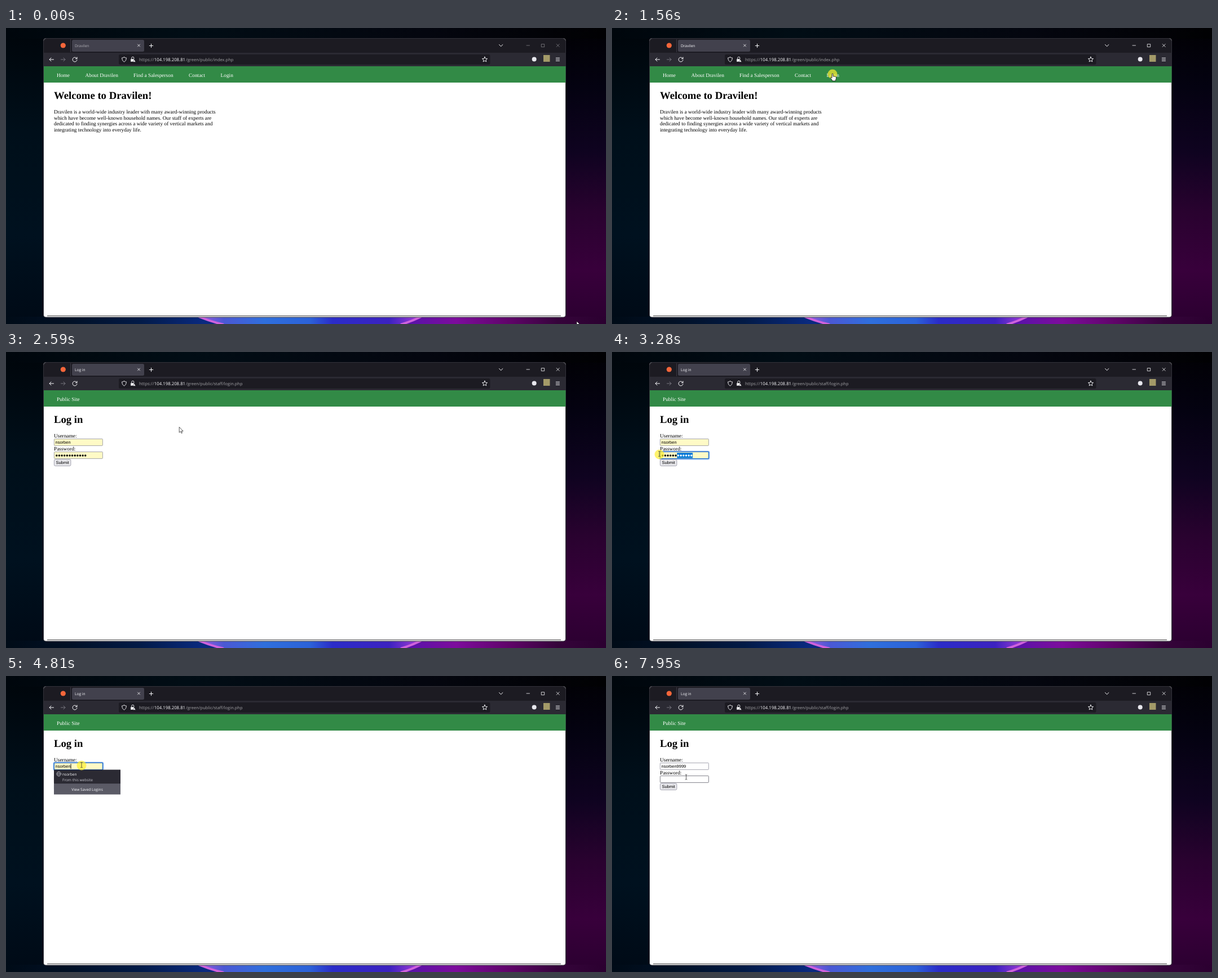
Animation, 1064 px wide and 526 px high, one loop 8 s. Source, as an HTML page:

```html
<!DOCTYPE html>
<html lang="en">
<head>
<meta charset="utf-8">
<title>Login demo</title>
<style>
  html, body { margin: 0; width: 100%; height: 100%; overflow: hidden; background: #000; }
  svg { display: block; width: 1064px; height: 526px; }
  text { text-rendering: geometricPrecision; white-space: pre; }
  .ui { font-family: "Open Sans", "Noto Sans", sans-serif; fill: #fbfbfe; }
  .page { font: 9.36px "Liberation Serif", "Times New Roman", serif; fill: #000; }
  .nav { fill: #fff; }
  .page .h1 { font-size: 18.72px; font-weight: bold; }
  .field { font: 7.5px "Liberation Sans", Arial, sans-serif; fill: #000; }
  .icon { fill: none; stroke: #fbfbfe; stroke-width: 1; stroke-linecap: round; stroke-linejoin: round; }
  .box { fill: #fff; stroke: #8f8f9d; stroke-width: .8; }
  .ring { fill: none; stroke: #0a5fd0; stroke-width: 1.3; }
  .halo { fill: none; stroke: #a9cdf5; stroke-width: 1.2; }
</style>
</head>
<body>
<svg viewBox="0 0 1064 526">
  <defs>
    <linearGradient id="left" x2="0" y2="1">
      <stop stop-color="#00050a"/><stop offset=".35" stop-color="#000f1a"/>
      <stop offset=".7" stop-color="#00111f"/><stop offset="1" stop-color="#000a16"/>
    </linearGradient>
    <linearGradient id="right" x2="0" y2="1">
      <stop stop-color="#010104"/><stop offset=".2" stop-color="#040211"/>
      <stop offset=".42" stop-color="#0f0320"/><stop offset=".62" stop-color="#29022f"/>
      <stop offset=".82" stop-color="#38003b"/><stop offset="1" stop-color="#2b0030"/>
    </linearGradient>
    <linearGradient id="top">
      <stop stop-color="#00060c"/><stop offset=".3" stop-color="#010d15"/>
      <stop offset=".7" stop-color="#04060f"/><stop offset="1" stop-color="#010103"/>
    </linearGradient>
    <linearGradient id="bottom">
      <stop stop-color="#000b17"/><stop offset=".1" stop-color="#011024"/>
      <stop offset=".22" stop-color="#021a46"/><stop offset=".33" stop-color="#0a2a80"/>
      <stop offset=".68" stop-color="#5c12a8"/><stop offset=".75" stop-color="#7d0c9c"/>
      <stop offset=".84" stop-color="#5f0468"/><stop offset=".92" stop-color="#35043a"/>
      <stop offset="1" stop-color="#2b0030"/>
    </linearGradient>
    <linearGradient id="bloom">
      <stop stop-color="#a45be0"/><stop offset=".12" stop-color="#4b58d4"/>
      <stop offset=".3" stop-color="#2f6fdc"/><stop offset=".5" stop-color="#2c62d8"/>
      <stop offset=".6" stop-color="#2b2cc8"/><stop offset=".85" stop-color="#3c22c0"/>
      <stop offset="1" stop-color="#b03fd8"/>
    </linearGradient>
    <g id="globe" class="icon" style="stroke:#c8c8d0;stroke-width:.6">
      <circle r="4"/><ellipse rx="1.8" ry="4"/><path d="M-4 0H4"/>
    </g>
  </defs>

  <!-- desktop -->
  <rect width="530" height="526" fill="url(#left)"/>
  <rect x="530" width="534" height="526" fill="url(#right)"/>
  <rect width="1064" height="19" fill="url(#top)"/>
  <rect y="513" width="1064" height="13" fill="url(#bottom)"/>
  <path d="M338 513H740Q722 521 700 527H384Q362 523 338 513Z" fill="url(#bloom)"/>
  <path d="M342 513Q364 522 386 527M736 513Q720 521 700 527" fill="none" stroke="#cf62dc" stroke-width="4"/>

  <!-- browser window -->
  <rect x="66.5" y="18.5" width="926" height="495.5" rx="4" fill="#fff" stroke="#33323a"/>
  <path d="M67 44V23a4 4 0 0 1 4-4H988a4 4 0 0 1 4 4V44Z" fill="#1c1b22"/>
  <rect x="67" y="44" width="925.5" height="24" fill="#2b2a33"/>
  <rect x="67" y="68" width="925.5" height="29" fill="#328a46"/>
  <rect x="73" y="511" width="911" height="1" fill="#444"/>
  <rect x="117" y="21" width="128" height="21" rx="2.5" fill="#42414d"/>
  <rect x="114" y="20" width="1" height="23" fill="#3a3943"/>
  <rect x="200" y="47" width="658.5" height="18" rx="2.5" fill="#1c1b22"/>
  <circle cx="101.3" cy="31" r="4.6" fill="#f5663a"/>
  <circle cx="936.7" cy="55.5" r="4" fill="#e8e8ee"/>
  <rect x="953" y="48" width="11.5" height="12" fill="#a39a68"/>
  <g class="icon">
    <path d="M233.5 29l4 4m0-4l-4 4" stroke-width=".8"/>
    <path d="M254.3 31.5h6.4m-3.2-3.2v6.4"/>
    <path d="M874.5 29.5l3.2 3.2 3.2-3.2"/>
    <path d="M84.5 56H77m3-3l-3 3 3 3"/>
    <path d="M97.5 56H105m-3-3l3 3-3 3" stroke="#77767f"/>
    <path d="M209.5 51.8q2 1.3 4 1.3 0 5.300-4 7.200-4-1.900-4-7.200 2 0 4-1.300Z" stroke-width=".9"/>
    <path d="M222.800 55v-1.700a2 2 0 0 1 4 0V55" stroke-width=".9"/>
    <path d="M221.700 55.500h5v4h-5Z" fill="#fbfbfe" stroke-width=".6"/>
    <path d="M227.500 56l2.300 4.300h-4.600Z" fill="#fbfbfe" stroke="#1c1b22" stroke-width=".5"/>
    <path id="star" stroke-width=".9"/>
    <path d="M975.300 53.200h6.200m-6.200 2.600h6.200m-6.200 2.600h6.200" stroke-width=".9"/>
    <path id="reload" d="M125.500 54a4 4 0 1 0 .5 2.800M126 52v2.700h-2.700"/>
    <path id="stop" d="M119 53l6.400 6.400m0-6.400L119 59.400"/>
    <path id="controls" d="M923 31h5.500M949.700 28.700h5v5h-5ZM976.200 28.500l5 5m0-5l-5 5" stroke-width=".8"/>
  </g>
  <g class="ui" font-size="7.8">
    <circle id="throb" cy="31" r="1.100"/>
    <text id="tab" x="122" y="33.700" font-size="6.600"></text>
    <text x="236" y="59" fill-opacity=".6">https://</text>
    <text x="262.800" y="59">104.198.208.81</text>
    <text id="path" x="319" y="59" font-size="7.500" fill-opacity=".6"></text>
  </g>

  <!-- welcome page -->
  <g id="home" class="page">
    <g class="nav">
      <text x="90" y="86.500">Home</text><text x="140.500" y="86.500">About Dravilen</text>
      <text x="226" y="86.500">Find a Salesperson</text><text x="324" y="86.500">Contact</text>
      <text x="380.500" y="86.500">Login</text>
    </g>
    <text class="h1" x="85" y="126.300">Welcome to Dravilen!</text>
    <text x="85" y="152">Dravilen is a world-wide industry leader with many award-winning products</text>
    <text x="85" y="162.500">which have become well-known household names. Our staff of experts are</text>
    <text x="85" y="173">dedicated to finding synergies across a wide variety of vertical markets and</text>
    <text x="85" y="183.500">integrating technology into everyday life.</text>
  </g>
  <g id="status">
    <path d="M67 502H228a2 2 0 0 1 2 2V514H70a3 3 0 0 1-3-3Z" fill="#38373f"/>
    <text class="ui" x="68.500" y="510.700" font-size="6.600">https://104.198.208.81/green/public/staff/index.php</text>
  </g>

  <!-- login page -->
  <g id="login" class="page">
    <text class="nav" x="90" y="86.500">Public Site</text>
    <text class="h1" x="85" y="126.300">Log in</text>
    <text x="85" y="152">Username:</text>
    <text x="85" y="175">Password:</text>
    <rect id="userBox" class="box" x="85.400" y="154.400" width="86" height="12" rx="1"/>
    <rect id="passBox" class="box" x="85.400" y="177.400" width="86" height="12" rx="1"/>
    <g id="focus">
      <rect class="halo" x="84" y="153" width="88.800" height="14.800" rx="2"/>
      <rect class="ring" x="85.200" y="154.200" width="86.400" height="12.400" rx="1"/>
    </g>
    <text id="user" class="field" x="87.500" y="163.200"></text>
    <rect id="caret" y="156" width=".9" height="9"/>
    <rect id="marked" y="179" height="9.500" fill="#0078d7"/>
    <g id="dots"></g>
    <rect x="85.400" y="190.900" width="29.500" height="11.500" rx="2" fill="#e9e9ed" stroke="#8f8f9d" stroke-width=".8"/>
    <text class="field" x="100.100" y="199.300" text-anchor="middle">Submit</text>
    <g id="popup" class="ui" font-size="6.550">
      <g id="entry">
        <rect x="85" y="0" width="118" height="25.500" fill="#2b2a33"/>
        <use href="#globe" x="93.700" y="7.500"/>
        <text x="100" y="10.300">nsorben</text>
        <text x="100" y="20.500" fill="#c3c3cb">From this website</text>
      </g>
      <g id="footer">
        <rect x="85" y="0" width="118" height="19.300" fill="#5b5b66"/>
        <text x="144" y="12.500" text-anchor="middle">View Saved Logins</text>
      </g>
    </g>
  </g>

  <g id="cursor">
    <circle id="spot" cx="0" cy="1" r="8.500" fill="#ffee30" opacity=".7"/>
    <path id="arrow" d="M0 0V9.800L2.300 7.700 3.900 11.100 5.400 10.400 3.900 7.200H6.900Z" fill="#fff" stroke="#111" stroke-width=".7"/>
    <path id="hand" d="M-1 1q0-1 1-1t1 1V5q4-.3 5.500 1.200Q7 9 5.500 11.500V13H-.5V11.700L-3.200 8.200q-.3-1.700 1.200-1.400l1 1Z" fill="#fff" stroke="#111" stroke-width=".8"/>
    <path id="beam" d="M-1.800-4.500H-.5L0-4 .5-4.500H1.800M0-4V4M-1.800 4.500H-.5L0 4 .5 4.500H1.800" fill="none" stroke="#333" stroke-width=".8"/>
  </g>
</svg>
<script>
const LOOP = 8000, TICK = 70, DOTS = 12;
const el = {};
document.querySelectorAll('[id]').forEach(e => el[e.id] = e);

// pointer track: time, x, y and a new shape where it changes
const track = [
  [0, 1012, 521, 'arrow'], [70, 880, 478], [110, 880, 478], [180, 739, 439.500],
  [290, 739, 439.500], [560, 562, 318], [680, 562, 318], [1030, 461.500, 150.500],
  [1240, 406, 70], [1430, 391, 81, 'hand'], [1900, 391, 81], [2190, 376.500, 98],
  [2330, 376, 99], [2400, 366, 110, 'arrow'], [2700, 240, 160], [3000, 150, 181, 'beam'],
  [3220, 150, 181], [3280, 84, 181], [3360, 62, 182], [3430, 59, 182],
  [3620, 59, 182, 'arrow'], [3760, 119, 198], [4350, 119, 198], [4490, 133, 143],
  [4620, 134, 158, 'beam'], [6330, 134, 158], [6470, 143, 159], [6860, 143, 159],
  [6930, 144, 159], [7060, 144, 159], [7130, 180, 180, 'arrow'], [7340, 317, 261],
  [7540, 317, 261], [7880, 132, 180, 'beam'], [7950, 131.500, 179.500], [LOOP, 131.500, 179.500]
];
const presses = [[1560, 1760], [3220, 3620], [4690, 4870], [7400, 7540]];

const show = (id, on) => { el[id].style.display = on ? '' : 'none'; };
const within = (t, a, b) => t >= a && t < b;
const shift = (id, x, y) => el[id].setAttribute('transform', `translate(${x} ${y})`);

el.star.setAttribute('d', 'M' + Array.from({ length: 10 }, (_, i) => {
  const a = i * Math.PI / 5 - Math.PI / 2, r = i % 2 ? 2.2 : 4.8;
  return `${849 + r * Math.cos(a)} ${56 + r * Math.sin(a)}`;
}).join('L') + 'Z');

for (let i = 0; i < DOTS; i++) {
  const dot = document.createElementNS('http://www.w3.org/2000/svg', 'circle');
  dot.setAttribute('cx', 89.800 + i * 4.630);
  dot.setAttribute('cy', 183.900);
  dot.setAttribute('r', 1.750);
  el.dots.append(dot);
}

function drawPointer(t) {
  let i = 0, shape = 'arrow';
  while (i < track.length - 1 && track[i + 1][0] <= t) i++;
  for (let k = 0; k <= i; k++) shape = track[k][3] || shape;
  const [t0, x0, y0] = track[i], [t1, x1, y1] = track[i + 1] || track[i];
  const f = t1 > t0 ? Math.floor((t - t0) / TICK) * TICK / (t1 - t0) : 0;
  shift('cursor', x0 + (x1 - x0) * f, y0 + (y1 - y0) * f);
  for (const id of ['arrow', 'hand', 'beam']) show(id, id === shape);
  show('spot', presses.some(([a, b]) => within(t, a, b)));
}

function drawBrowser(t) {
  const active = t >= 1560, loading = within(t, 1760, 2400), login = t >= 2400;
  show('home', !login);
  show('login', login);
  show('status', within(t, 1630, 2400));
  show('stop', loading);
  show('reload', !loading);
  show('throb', loading);
  el.throb.setAttribute('cx', 129.500 + 3 * Math.sin((t - 2190) / 110));
  el.tab.textContent = login ? 'Log in' : 'Dravilen';
  el.tab.setAttribute('x', loading ? 134 : 122);
  el.tab.setAttribute('fill-opacity', active ? 1 : .6);
  el.controls.setAttribute('stroke-opacity', active ? 1 : .45);
  el.path.textContent = '/green/public/' + (login ? 'staff/login.php' : 'index.php');
}

function drawForm(t) {
  const onUser = within(t, 4690, 7470), nines = [5800, 6070, 6270, 6470].filter(k => t >= k).length;
  el.user.textContent = 'nsorben' + '9'.repeat(nines);
  el.userBox.style.fill = nines ? '#fff' : '#fffac6';
  el.passBox.style.fill = t < 4080 ? '#fffac6' : '#fff';
  el.passBox.style.stroke = t >= 7880 ? '#62626c' : '';
  show('focus', onUser || within(t, 3220, 4690));
  shift('focus', 0, onUser ? 0 : 23);
  show('caret', onUser && !within(t, 5270, 5800) && t < 6930);
  el.caret.setAttribute('x', 114.600 + nines * 4.170);

  const picked = t < 3280 || t >= 4080 ? 0 : t < 3360 ? 6 : DOTS;
  show('dots', t < 4080);
  [...el.dots.children].forEach((d, i) => d.setAttribute('fill', i >= DOTS - picked ? '#fff' : '#000'));
  el.marked.setAttribute('x', 87.500 + (DOTS - picked) * 4.630);
  el.marked.setAttribute('width', picked * 4.630);

  const short = t >= 5870;
  show('popup', within(t, 4080, 7470));
  show('entry', !short);
  shift('popup', 0, onUser ? 166.500 : 190);
  shift('footer', 0, short ? 0 : 24.700);
}

function frame() {
  const t = performance.now() % LOOP;
  drawBrowser(t);
  drawForm(t);
  drawPointer(t);
  requestAnimationFrame(frame);
}
frame();
</script>
</body>
</html>
```
